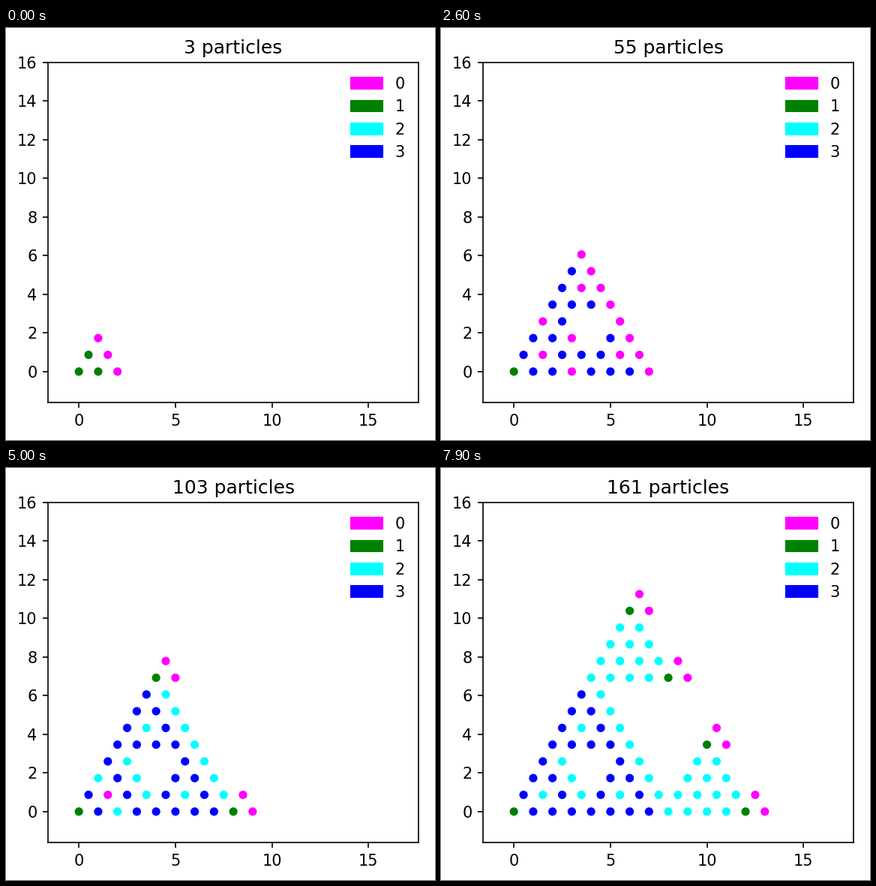
A matplotlib script for the animation above (8000 ms loop, 572 by 549 pixels).

```python
import matplotlib.pyplot as plt
import numpy as np
from matplotlib.animation import FuncAnimation
from matplotlib.patches import Patch

W, H, DPI = 572, 549, 150
FRAMES, INTERVAL = 80, 100
COLORS = ["magenta", "green", "cyan", "blue"]


def neighbours(v):
    """Adjacent gasket vertices, in skew lattice coordinates."""
    i, j = v
    found = []
    for a, b in ((i, j), (i - 1, j), (i, j - 1)):
        if a >= 0 and b >= 0 and a & b == 0:
            found += [p for p in ((a, b), (a + 1, b), (a, b + 1)) if p != v]
    return found


def add_grains(pile, count):
    """Drop grains on the corner and topple until the pile is stable."""
    pile[0, 0] = pile.get((0, 0), 0) + count
    active = [(0, 0)]
    while active:
        v = active.pop()
        near = neighbours(v)
        if pile[v] < len(near):
            continue
        pile[v] -= len(near)
        for p in near:
            pile[p] = pile.get(p, 0) + 1
        active += near + [v]


def snapshot(pile):
    """Positions and heights of touched vertices and their neighbours."""
    shown = dict(pile)
    for v in pile:
        for p in neighbours(v):
            shown.setdefault(p, 0)
    xy = [(i + j / 2, j * np.sqrt(3) / 2) for i, j in shown]
    return np.array(xy), [COLORS[n] for n in shown.values()]


def run():
    pile, states = {}, []
    for k in range(FRAMES):
        add_grains(pile, 2 if k else 3)
        states.append(snapshot(pile))
    return states


states = run()

fig = plt.figure(figsize=((W + 1e-6) / DPI, (H + 1e-6) / DPI), dpi=DPI)
ax = fig.add_axes([56 / W, 50 / H, 494.2 / W, 453 / H])
ax.set_xlim(-1.6, 17.6)
ax.set_ylim(-1.6, 16)
ax.set_xticks(range(0, 16, 5))
ax.set_yticks(range(0, 17, 2))
ax.legend(handles=[Patch(color=c, label=str(n)) for n, c in enumerate(COLORS)],
          loc="upper right", frameon=False)
title = ax.set_title("")
dots = ax.scatter([], [], s=15, linewidths=1.5)


def update(k):
    xy, colors = states[k]
    dots.set_offsets(xy)
    dots.set_color(colors)
    title.set_text(f"{3 + 2 * k} particles")
    return dots, title


anim = FuncAnimation(fig, update, frames=FRAMES, interval=INTERVAL,
                     repeat=True, repeat_delay=0, blit=False)
plt.show()
```
